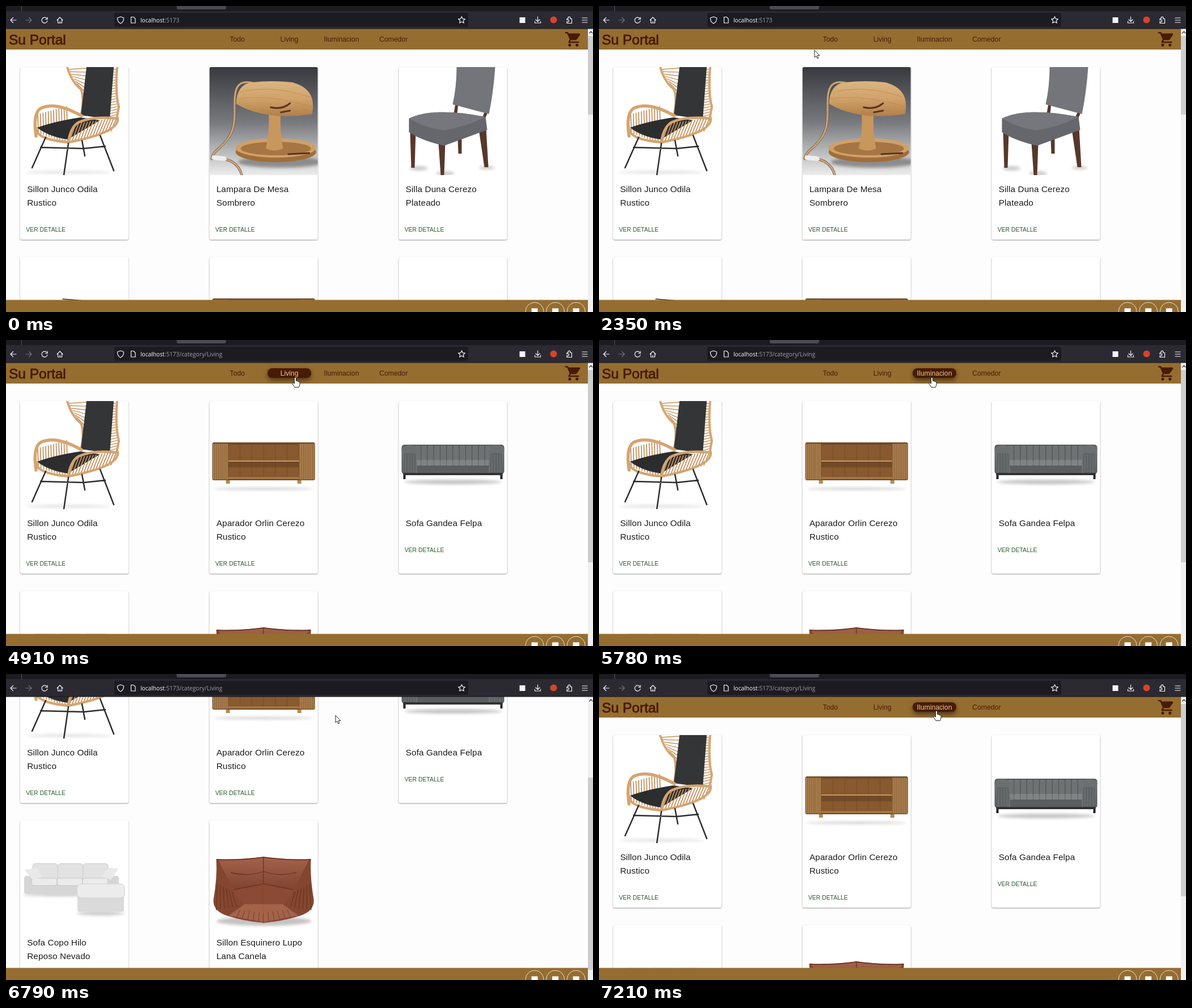
These frames come from a looping animation (1035x541 px, 8000 ms). An HTML page:

```html
<!DOCTYPE html>
<html lang="es">
<head>
<meta charset="utf-8">
<title>Su Portal</title>
<style>
  html, body { margin: 0; width: 100%; height: 100%; overflow: hidden; background: #fdfdfd; }
  #stage { display: block; width: 1035px; height: 541px; font-family: "Liberation Sans", Arial, sans-serif; }
  .card { fill: #fff; filter: drop-shadow(0 1px .8px #0006); }
  .title { font-size: 15.3px; letter-spacing: .115px; fill: #1c1c1c; }
  .more { font-size: 10.4px; fill: #2b5a30; }
  .nav { font-size: 12.24px; text-anchor: middle; fill: #4a1c06; }
  .lit { fill: #ecc994; }
  .url { font: 10.2px "Open Sans", "Noto Sans", sans-serif; }
  .icon { fill: none; stroke: #f4f4f6; stroke-width: 1.2; stroke-linecap: round; stroke-linejoin: round; }
</style>
</head>
<body>
<svg id="stage" viewBox="0 0 1035 541"></svg>
<script>
const BROWN = '#956d30', DARK = '#481b04';
const $ = id => document.getElementById(id);
const repeat = (n, fn) => Array.from({ length: n }, (_, i) => fn(i)).join('');
const rect = (x, y, w, h, fill, extra = '') =>
  `<rect x="${x}" y="${y}" width="${w}" height="${h}" fill="${fill}" ${extra}/>`;
const oval = (x, y, rx, ry, fill, extra = '') =>
  `<ellipse cx="${x}" cy="${y}" rx="${rx}" ry="${ry}" fill="${fill}" ${extra}/>`;
const shape = (d, fill) => `<path d="${d}" fill="${fill}"/>`;
const line = (d, color, w = 1, extra = '') =>
  `<path d="${d}" fill="none" stroke="${color}" stroke-width="${w}" stroke-linecap="round" stroke-linejoin="round" ${extra}/>`;
const shadow = (x, y, rx, ry, o = .3) => oval(x, y, rx, ry, '#555', `opacity="${o}" filter="url(#soft)"`);
// A drawing together with its mirror image in the 191 px square
const both = s => `${s}<g transform="matrix(-1 0 0 1 191 0)">${s}</g>`;
// n upright rounded strips side by side
const flutes = (x, y, w, h, n, fill, seam, r = 1.5) =>
  repeat(n, i => rect(x + i * w / n, y, w / n, h, fill, `rx="${r}" stroke="${seam}"`));
// n + 1 struts from the edge ab to the edge cd
function fan([ax, ay, bx, by], [cx, cy, dx, dy], n, color, w) {
  const mix = (p, q, i) => p + (q - p) * i / n;
  return line(repeat(n + 1, i => `M${mix(ax, bx, i)} ${mix(ay, by, i)}L${mix(cx, dx, i)} ${mix(cy, dy, i)}`), color, w);
}

const CANE = '#c4925f', RIM = '#d5a470', STEEL = '#2c2d2f', LEG = '#57382a';
const rope = 'M80 29C30 15 50 70 42 105S5 145 4 162Q48 158 57 191';
const pictures = {
  rattan: () =>
    shadow(85, 186, 75, 3, .15) +
    fan([85, 4, 108, 42], [117, 2, 112, 64], 9, CANE, 1.4) +
    fan([163, 4, 158, 92], [171, 4, 173, 88], 18, CANE, 1.4) +
    line('M83 0Q90 26 108 40Q113 60 107 86M171 0Q167 45 174 70L170 92', RIM, 4) +
    shape('M117 0H165L158 92L107 85Z', '#333537') +
    fan([31, 84, 82, 70], [32, 116, 84, 134], 11, CANE, 1.8) +
    shape('M30 107Q60 96 106 89L141 94L84 128Q50 123 30 107Z', '#2b2d2e') +
    line('M28 122Q22 82 36 73Q62 60 108 86', RIM, 5.5) +
    fan([98, 100, 170, 90], [86, 133, 160, 113], 14, CANE, 1.8) +
    line('M28 108Q28 128 85 133Q88 108 102 98Q128 86 172 91Q174 116 85 133', RIM, 4.5) +
    line('M45 124L21 178M85 135L77 191M141 121L165 183M109 130L114 157M36 142L112 144L150 140', STEEL, 2.5),
  lamp: () =>
    rect(0, 0, 191, 194, 'url(#studio)', 'rx="3"') + shadow(125, 168, 75, 10, .55) +
    line(rope, '#75593f', 4.5) + line(rope, '#c8a67c', 3, 'stroke-dasharray="3 1.5"') + line('M8 160L26 162', '#eee', 8) +
    oval(117, 150, 71, 18, '#a06d3b') + oval(117, 143, 71, 17, '#d0a067') + oval(117, 144, 62, 12, '#a57544') +
    shape('M104 72H126Q123 115 130 144Q115 151 99 144Q107 115 104 72Z', '#c8975c') +
    shape('M47 65Q48 30 75 27Q110 23 146 27Q190 38 181 83Q100 96 47 65Z', 'url(#oak)') +
    line('M54 44Q115 31 176 53M50 56Q110 48 180 70', '#b98950', .8) +
    line('M108 71Q128 76 142 64M126 80L142 77M139 154L176 152', '#5a3420', 3),
  chair: () =>
    shadow(35, 179, 16, 4) + shadow(82, 188, 16, 4) + shadow(155, 178, 14, 3) +
    shape('M104 126H111V153H105ZM142 116L154 108L158 177H151ZM20 113L30 116L28 178H22ZM70 134H82L80 191H74ZM100 64H105L103 82H97ZM152 78H158L151 94H145Z', LEG) +
    shape('M102 0H170Q167 45 159 83L95 66Q102 35 102 0Z', '#73757a') +
    shape('M18 91Q60 70 153 88L156 111L80 139Q40 130 18 115Z', '#65676c') +
    shape('M18 91Q60 70 153 88Q120 105 79 112Q45 107 18 91Z', '#75777c'),
  sideboard: () =>
    shadow(95, 155, 88, 2) + both(rect(29, 136, 7, 10, '#b48a58')) +
    rect(5, 73, 181, 67, '#6f4a29', 'rx="3"') +
    flutes(33, 77, 125, 57, 6, '#89592f', '#7a4f2a', 0) + rect(33, 107, 125, 10, '#5d3c20', 'opacity=".5"') +
    rect(33, 105, 125, 2, '#c59a61') + rect(30, 134, 131, 4, '#a3743f') +
    both(flutes(5.5, 75, 27, 64, 8, '#ad8250', '#865d35')),
  velvet: () =>
    shadow(96, 143, 86, 4, .35) + both(rect(8, 128, 4, 10, '#222')) +
    rect(5, 77, 181, 52, '#5d6061', 'rx="5"') +
    flutes(28, 78, 135, 30, 12, '#6f7273', '#505354', 3) +
    flutes(28, 103, 135, 12, 12, '#808384', '#686b6c', 3) + rect(28, 114, 135, 13, '#5b5e60') +
    both(shape('M5 84Q14 74 30 80L33 128H9Z', '#6c6f70') + flutes(10, 93, 19, 34, 4, '#686b6c', '#55585a')) +
    rect(8, 127, 175, 4, '#303234'),
  cloud: () =>
    shadow(70, 131, 65, 3) + shadow(142, 164, 42, 4) +
    rect(7, 98, 167, 32, '#d6d6d6', 'rx="4"') +
    flutes(22, 76, 133, 34, 3, '#e2e2e2', '#cdcdcd', 5) + flutes(20, 102, 135, 13, 3, '#ebebeb', '#c6c6c6', 4) +
    shape('M7 87L30 84L38 100L23 106ZM173 85L157 84L141 99L160 105Z', '#e9e9e9') +
    rect(101, 118, 82, 43, '#dadada', 'rx="4"') + rect(100, 112, 84, 25, '#ececec', 'rx="8" stroke="#cfcfcf"'),
  corner: () =>
    shadow(96, 178, 84, 8, .35) + both(
      shape('M96 64Q50 70 12 68Q14 100 7 140Q6 160 30 168Q60 178 96 181Z', '#85462f') +
      shape('M96 65Q52 72 16 70Q30 100 44 122L96 112Z', 'url(#suede)') +
      shape('M96 108L42 124L58 148L96 152Z', '#8a4a33') +
      shape('M96 148L62 148L34 168L96 180Z', '#a4624a') +
      fan([14, 112, 40, 126], [12, 158, 48, 152], 5, '#6b3524', 1.4) +
      fan([54, 158, 96, 164], [48, 171, 96, 181], 5, '#7a402d', 1) +
      line('M13 69Q52 71 96 65V110M38 92Q68 100 96 90M44 122L96 112', '#683422', 1.3)),
  edge: () => line('M75 74L113 77L110 90', STEEL, 1.5),
  blank: () => ''
};

// Cards stand three to a row
function card([pic, ...title], i) {
  const words = title.map((s, n) => `<text class="title" x="12.2" y="${220.5 + 24.5 * n}">${s}</text>`).join('');
  return `<g transform="translate(${25 + 333.75 * (i % 3)} ${108 + 336 * Math.floor(i / 3)})">
    ${rect(0, 0, 191, 305, '#fff', 'class="card" rx="3"')}<svg width="191" height="191">${pictures[pic]()}</svg>
    ${words}<text class="more" x="10.2" y="${242 + 24.5 * title.length}">VER DETALLE</text></g>`;
}
const list = (id, ...items) => `<g id="${id}">${items.map(card).join('')}</g>`;

const armchair = ['rattan', 'Sillon Junco Odila', 'Rustico'];
const cabinet = ['sideboard', 'Aparador Orlin Cerezo', 'Rustico'];
const lists =
  list('everything', armchair, ['lamp', 'Lampara De Mesa', 'Sombrero'], ['chair', 'Silla Duna Cerezo', 'Plateado'],
    ['edge'], cabinet, ['blank']) +
  list('living', armchair, cabinet, ['velvet', 'Sofa Gandea Felpa'],
    ['cloud', 'Sofa Copo Hilo', 'Reposo Nevado'], ['corner', 'Sillon Esquinero Lupo', 'Lana Canela']);

// Each link has a hidden lit pill over it
function link(label, i) {
  const x = 407.8 + 91.85 * i, text = cls => `<text class="${cls}" x="${x}" y="63">${label}</text>`;
  return `${text('nav')}<g id="${label}" opacity="0">
    ${rect(x - 38.5, 53, 77, 18, '#000', 'rx="9" opacity=".5" filter="url(#glow)"')}
    ${rect(x - 38.5, 50, 77, 17, DARK, 'rx="8"')}${text('nav lit')}</g>`;
}
const cart = `<g transform="translate(985 43.5) scale(1.28)">${oval(7, 20, 2, 2, DARK)}${oval(17, 20, 2, 2, DARK)}
  ${line('M1.5 3H4L8 12L6 16H19', DARK, 2)}${shape('M5 4H20Q22 4 21 6L17 12Q16.500 13 15 13H8Z', DARK)}</g>`;
const header = rect(0, 40, 1026, 37, BROWN) +
  `<text x="5" y="68" font-size="24.5" fill="${DARK}" stroke="${DARK}" stroke-width=".8">Su Portal</text>` +
  ['Todo', 'Living', 'Iluminacion', 'Comedor'].map(link).join('') + cart;

const footer = rect(0, 519.6, 1026, 22, BROWN) + repeat(3, i => {
  const x = 932 + 36.6 * i;
  return `<circle cx="${x}" cy="540" r="16" fill="none" stroke="#e9dfcf"/>` + rect(x - 5.5, 534.5, 11, 11, '#fff');
});

const star = repeat(10, i => {
  const a = i * Math.PI / 5, r = i % 2 ? 3 : 6.3;
  return `${i ? 'L' : 'M'}${803.5 + r * Math.sin(a)} ${25 - r * Math.cos(a)}`;
}) + 'Z';
const icons = [star, 'M18 25H8M12.500 20.500L8 25L12.500 29.500', 'M72 22A5 5 0 1 0 73 26M73 20V23.500H69.500',
  'M90 25L95 20L100 25M91.500 24V30H98.500V24M95 30V27', 'M202 19L207.500 21Q208 28 202 31Q196 28 196.500 21Z',
  'M220.500 19.500H225L228 22.500V30H220.500Z', 'M937.500 19V27M934 24L937.500 27.500L941 24M932.500 27V30H942.500V27',
  'M989 22.500H991.500A2 2 0 1 1 994.500 22.500H997.500V30.500H989V27.500A2 2 0 1 0 989 25Z',
  'M1016 21H1025M1016 25H1025M1016 29H1025'];
const chrome = rect(0, 0, 1035, 10, '#1c1b22') + rect(27, 0, 1, 9, '#55545e') +
  rect(301, -6, 87, 12, '#4b4a55', 'rx="3"') + rect(0, 9, 1035, 31, '#2b2a33') + rect(0, 39.5, 1035, 1, '#15141a') +
  rect(191, 12, 624, 25, '#1c1b22', 'rx="3"') +
  `<path class="icon" d="${icons.join('')}"/>` + line('M35 25H45M40.500 20.500L45 25L40.500 29.500', '#74737c', 1.2) +
  rect(905.5, 20, 10, 10, '#f4f4f6') + oval(965.5, 24.5, 6, 6, '#d9432a') +
  '<text class="url" x="237" y="29" fill="#fbfbfe">localhost<tspan fill="#9f9ea6">:5173<tspan id="path">/category/Living</tspan></tspan></text>';

const fall = (id, ...colors) => `<linearGradient id="${id}" x2="0" y2="1">` +
  colors.map((c, i) => `<stop offset="${i / (colors.length - 1)}" stop-color="${c}"/>`).join('') + '</linearGradient>';
const blur = (id, r) => `<filter id="${id}" x="-50%" y="-200%" width="200%" height="500%"><feGaussianBlur stdDeviation="${r}"/></filter>`;
const outline = 'fill="#fff" stroke="#111" stroke-width=".9"';

$('stage').innerHTML = `<defs>${fall('studio', '#37393e', '#77797d', '#f0f0f0')}${fall('oak', '#dcb582', '#d1a26a', '#b17f49')}
  ${fall('suede', '#a3624a', '#7f4430')}${blur('soft', 2.5)}${blur('glow', 4)}</defs>
  ${rect(0, 0, 1035, 541, '#fdfdfd')}<g id="page">${lists}${header}</g>${footer}
  ${rect(1026, 40, 9, 501, '#f0f0f0')}${rect(1026, 53, 9, 139, '#cdcdcd', 'id="thumb"')}
  ${line('M1028.500 48L1031.500 45L1034 48', '#505050', 1.4)}${chrome}
  <g id="cursor"><path id="arrow" d="M0 0V13L3 10.300L5 15L7 14L5 9.600H9Z" ${outline}/>
  <path id="hand" d="M-1.500 1.500a1.500 1.500 0 0 1 3 0V6L6 7.500Q8 7.500 8 9V13L6.500 17.500H-1L-5 11.500q-1-2 1-2L-1.500 11Z" ${outline}/></g>`;

// The pointer's strokes: start, end, path
const moves = [
  [380, 580, 'M897 512L664 407'],
  [980, 1780, 'M664 407C560 280 420 83 310 83S190 130 181 190'],
  [1800, 2313, 'M181 190C140 260 90 322 130 322S300 160 380 78'],
  [2313, 2800, 'M380 78Q440 66 497 68'],
  [3380, 3780, 'M497 68L510 66'],
  [5380, 5580, 'M510 66L587 66'],
  [5980, 6180, 'M587 66L581 73'],
  [7047, 7180, 'M581 73L595 65']
].map(([from, to, d]) => {
  const track = document.createElementNS('http://www.w3.org/2000/svg', 'path');
  track.setAttribute('d', d);
  return { from, to, track };
});

const ramp = (t, from, to) => Math.max(0, Math.min(1, (t - from) / (to - from)));
const easeInOut = u => u < .5 ? 4 * u ** 3 : 1 - 4 * (1 - u) ** 3;
const fade = (t, on, off) => ramp(t, on, on + 130) * (1 - ramp(t, off, off + 130));
const set = (id, name, value) => $(id).setAttribute(name, value);
const show = (id, on) => set(id, 'display', on ? 'inline' : 'none');

const STEP = 1000 / 15;
function draw(now) {
  const time = now % 8000;
  // The picture is held between steps
  const t = 380 + Math.floor((time - 380) / STEP + .25) * STEP + 1;
  const { from, to, track } = moves.findLast(m => m.from <= t) ?? moves[0];
  const spot = track.getPointAtLength(track.getTotalLength() * ramp(t, from, to));
  const scroll = 192 * (ramp(t, 5977, 6313) ** 2 - easeInOut(ramp(t, 6675, 7180)));
  const filtered = time >= 4905, pointing = t > 2680 && t < 5990 || t > 7110;

  show('everything', !filtered);
  show('living', filtered);
  show('path', time >= 3050);
  show('cursor', time >= 380);
  show('hand', pointing);
  show('arrow', !pointing);
  set('cursor', 'transform', `translate(${Math.round(spot.x)} ${Math.round(spot.y)})`);
  set('page', 'transform', `translate(0 ${-Math.round(scroll)})`);
  set('thumb', 'y', 53 + scroll * .703);
  set('thumb', 'height', filtered ? 340 : 139);
  set('Living', 'opacity', fade(t, 2640, 5400));
  set('Iluminacion', 'opacity', fade(t, 5400, 5960) + fade(t, 7050, 9000));
  requestAnimationFrame(draw);
}
requestAnimationFrame(draw);
</script>
</body>
</html>
```
